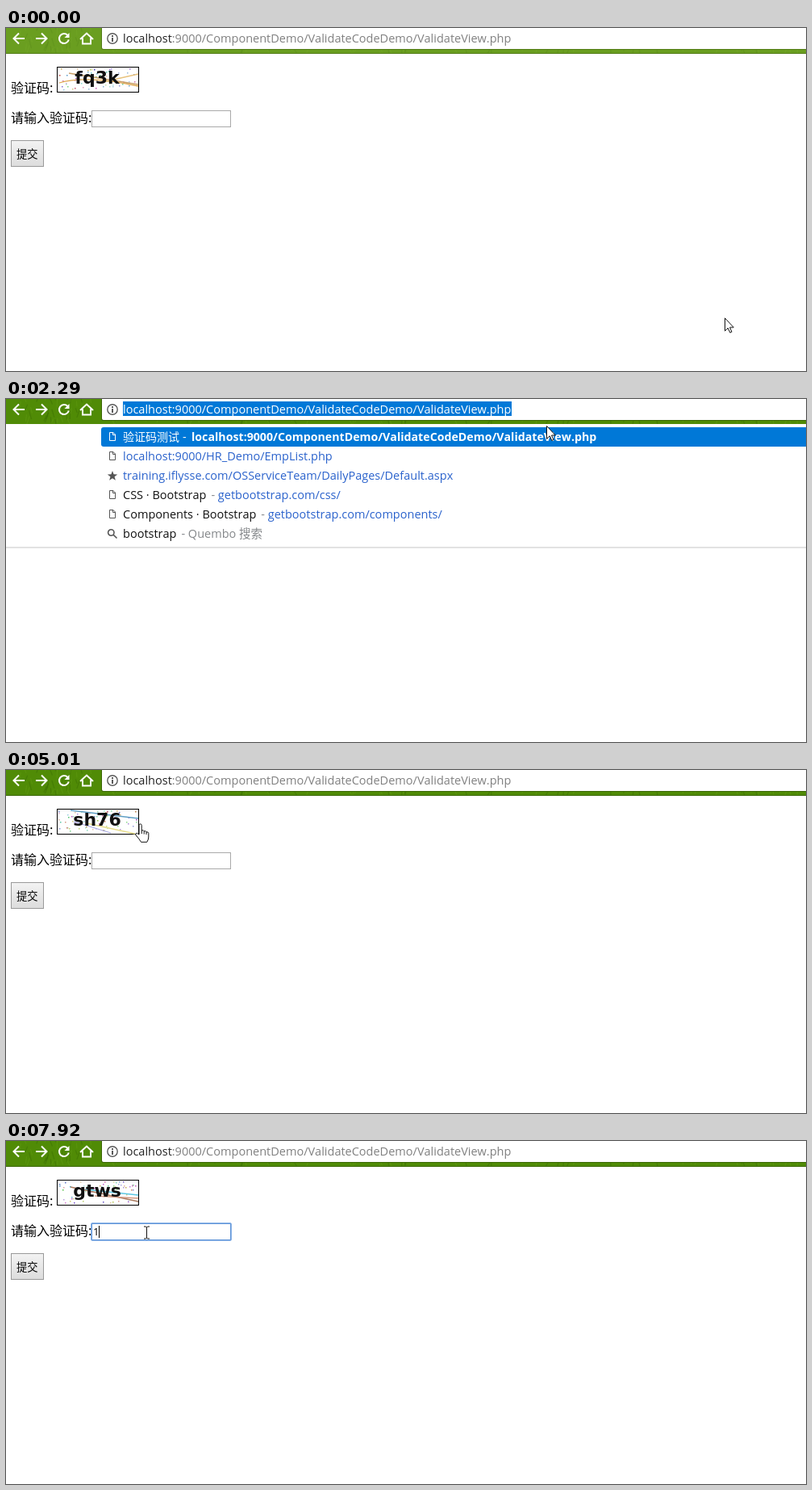
An HTML page with a canvas for the animation above (7.99 s loop, 992 by 425 pixels).

```html
<!DOCTYPE html>
<html lang="zh">
<head>
<meta charset="utf-8">
<style>
html, body { margin: 0; width: 992px; height: 425px; overflow: hidden; background: #fff; }
canvas { display: block; }
</style>
</head>
<body>
<canvas id="stage" width="992" height="425"></canvas>
<script>
const c = document.getElementById('stage').getContext('2d');
const LOOP = 7990, BLUE = '#0078d7', LINK = '#2a62cc', GREY = '#85888b';
const UI = '"Open Sans", "Noto Sans CJK SC", sans-serif';
const CJK = '"Noto Sans CJK SC", "Noto Sans CJK", sans-serif';
const HEAVY = 'bold 22px "DejaVu Sans", sans-serif';
const HOST = 'localhost', PATH = ':9000/ComponentDemo/ValidateCodeDemo/ValidateView.php';
c.fontKerning = 'none';

// Pointer moves: start, end, steps, x, y, shape on arrival
const moves = [
  [70, 360, 5, 673, 12, 'beam'],
  [1850, 1850, 1, 671, 25, 'arrow'],
  [1930, 2070, 3, 651, 45, 'arrow'],
  [2140, 2290, 3, 670, 33, 'arrow'],
  [2390, 2390, 1, 671, 32, 'arrow'],
  [2610, 2760, 3, 651, 42, 'arrow'],
  [3450, 3770, 5, 477, 135, 'arrow'],
  [3920, 3990, 2, 463, 137, 'arrow'],
  [4160, 4530, 6, 124, 61, 'hand'],
  [4860, 4860, 1, 164, 61, 'hand'],
  [5010, 5010, 1, 160, 66, 'hand'],
  [5080, 5160, 2, 142, 70, 'hand'],
  [6340, 6340, 1, 149, 69, 'arrow'],
  [6500, 6810, 5, 174, 113, 'beam']
];
const shapes = {
  arrow: new Path2D('M.5 .5V16.3L4.2 12.8L6.8 18.5L9 17.5L6.5 12H11.3Z'),
  hand: new Path2D('M5 14V2.5a1.6 1.6 0 0 1 3.2 0V9q2.5-1 3 .8q2.3-.8 2.8 1q2.5-.4 2.8 1.6V17q0 3-2 6.3H7.5Q5 19 1 14.8Q0 12.5 2.4 12.2Z'),
  beam: new Path2D('M-3.5-7.5H-1L0-6.5L1-7.5H3.5M0-6.5V6.5M-3.5 7.5H-1L0 6.5L1 7.5H3.5')
};
// Captcha codes with their scratch lines: colour, path
const captchas = [
  ['fq3k', [['#e0a850', 'M66 68Q100 58 164 72'], ['#c9a06a', 'M78 56L164 70'], ['#e8c27c', 'M120 67L164 57']]],
  ['sh76', [['#5f9fc4', 'M80 50L164 60'], ['#e6dc8a', 'M100 66L160 79'], ['#a9a9e4', 'M84 64L130 78']]],
  ['gtws', [['#5cc8e4', 'M98 60L164 67'], ['#a8785c', 'M80 57L164 75'], ['#d09880', 'M110 68L164 71']]]
];

function seeded(s) {
  return () => {
    s = s + 0x6D2B79F5 | 0;
    let z = Math.imul(s ^ s >>> 15, 1 | s);
    z = z + Math.imul(z ^ z >>> 7, 61 | z) ^ z;
    return ((z ^ z >>> 14) >>> 0) / 4294967296;
  };
}
function progress(t, t0, t1, n) {
  if (t < t0) return 0;
  return t >= t1 ? 1 : (Math.floor((t - t0) / (t1 - t0) * (n - 1)) + 1) / n;
}
function rect(x, y, w, h, fill, line) {
  c.fillStyle = fill;
  c.fillRect(x, y, w, h);
  if (line) {
    c.strokeStyle = line;
    c.lineWidth = 1;
    c.strokeRect(x + .5, y + .5, w - 1, h - 1);
  }
}
function rounded(x, y, w, h, r, fill) {
  c.fillStyle = fill;
  c.beginPath();
  c.roundRect(x, y, w, h, r);
  c.fill();
}
function text(s, x, y, color, font) {
  c.font = font || '14.5px ' + UI;
  c.fillStyle = color;
  c.fillText(s, x, y);
  return x + c.measureText(s).width;
}
function stroke(path, color, width = 1) {
  c.strokeStyle = color;
  c.lineWidth = width;
  c.stroke(typeof path === 'string' ? new Path2D(path) : path);
}

function drawBar(t) {
  const p = progress(t, 610, 760, 3), rnd = seeded(5);
  const mix = (a, b) => a + (b - a) * p;
  const edge = `rgb(${mix(82, 58)},${mix(125, 103)},${mix(22, 4)})`;
  rect(0, 0, 992, 32, `rgb(${mix(106, 80)},${mix(158, 139)},${mix(32, 6)})`);
  c.save();
  c.beginPath();
  c.rect(0, 0, 992, 31);
  c.clip();
  for (let i = 0; i < 420; i++) {
    const x = rnd() * 992, y = rnd() * 34, lean = rnd() * 8 - 4;
    c.strokeStyle = rnd() < .5 ? `rgba(30,70,0,${.08 + .12 * p})` : 'rgba(150,200,60,.13)';
    c.lineWidth = 1.2;
    c.beginPath();
    c.moveTo(x, y);
    c.lineTo(x + lean, y - 5 - rnd() * 6);
    c.stroke();
  }
  c.restore();
  rect(0, 31, 992, 1, edge);

  stroke('M23 13H10M16 6.5L9.5 13L16 19.5', '#fff', 2);
  stroke('M37 13H50M44 6.5L50.5 13L44 19.5', '#fff', 2);
  if (t >= 3080 && t < 3450) stroke('M66.5 7.5L77.5 18.5M77.5 7.5L66.5 18.5', '#fff', 1.8);
  else {
    stroke('M76.2 8.8A6 6 0 1 0 77.8 14.5', '#fff', 2);
    c.fillStyle = '#fff';
    c.fill(new Path2D('M78.5 6V12H72.5Z'));
  }
  stroke('M92 14L100 6.5L108 14M95 12.5V19.5H105V12.5', '#fff', 2);

  rounded(118, -4, 880, 31, 3, edge);
  rounded(119, -4, 880, 30, 2, '#fff');
  stroke('M138.2 13a6.2 6.2 0 1 1-12.4 0a6.2 6.2 0 1 1 12.4 0', '#5a5a5a', 1.4);
  rect(131, 9, 2, 2, '#5a5a5a');
  rect(131, 12, 2, 5, '#5a5a5a');
  const selected = t >= 910 && t < 3080;
  if (selected) rect(145, 3, 482, 18, BLUE);
  const x = text(HOST, 145, 18, selected ? '#fff' : '#222');
  text(PATH, x, 18, selected ? '#fff' : '#808080');
  if (t >= 610 && t < 910) rect(627, 4, 1, 17, '#222');
}

function drawCaptcha(t) {
  const id = t < 4780 ? 0 : t < 6500 ? 1 : 2, [code, lines] = captchas[id], rnd = seeded(id + 21);
  rect(63, 48, 102, 32, '#fff', '#000');
  for (let i = 0; i < 65; i++) {
    const x = 65 + rnd() * 97, y = 50 + rnd() * 27;
    rect(Math.floor(x), Math.floor(y), 1.5, 1.5, `hsl(${rnd() * 360},50%,${50 + rnd() * 30}%)`);
  }
  lines.forEach(([color, path]) => stroke(path, color, 1.3));
  c.textAlign = 'center';
  text(code, 113, 69, '#111', HEAVY);
  c.textAlign = 'left';
}

function drawPage(t) {
  text('验证码:', 6, 80, '#000', '16px ' + CJK);
  drawCaptcha(t);
  text('请输入验证码:', 6, 117, '#000', '16px ' + CJK);
  const focus = t >= 6890;
  rect(106, 102, 173, 21, '#fff', focus ? '#5f94d8' : '#a9a9a9');
  if (focus) {
    c.strokeStyle = '#8fb6e8';
    c.beginPath();
    c.roundRect(105.5, 101.5, 174, 22, 1.5);
    c.stroke();
  }
  if (t >= 7920) {
    text('1', 108, 117, '#000', '13.3px ' + UI);
    rect(115, 105, 1, 15, '#000');
  } else if (focus && t < 7520) rect(108, 105, 1, 15, '#000');
  if (t >= 6970 && t < 7920) rect(105, 124, 176, 145, '#fff', '#c8c8c8');

  const g = c.createLinearGradient(0, 139, 0, 172);
  g.addColorStop(0, '#f3f3f3');
  g.addColorStop(1, '#dcdcdc');
  rect(6, 139, 41, 33, g, '#9a9a9a');
  text('提交', 13, 161, '#000', '13.3px ' + CJK);

  if (t >= 5560 && t < 6420) {
    c.globalAlpha = progress(t, 5560, 5790, 4);
    rect(149, 96, 61, 22, 'rgba(0,0,0,.16)');
    rect(148, 95, 61, 22, 'rgba(0,0,0,.25)');
    rect(146, 93, 61, 22, '#fff', '#8a8a8a');
    text('点击刷新', 152, 108, '#808080', '12px ' + CJK);
    c.globalAlpha = 1;
  }
}

function docIcon(y, color) {
  stroke(`M128.5 ${y - 5.5}H133L135.5 ${y - 3}V${y + 4.5}H128.5ZM132.5 ${y - 5}V${y - 2.5}H135`, color);
}
function drawSuggestions() {
  rect(0, 31, 992, 152, '#fff');
  rect(0, 183, 992, 2, '#e2e2e2');
  rounded(118, 35, 880, 24, 3, BLUE);
  text('验证码测试', 145, 52, '#fff', '14px ' + CJK);
  text('-', 219, 52, '#fff');
  text(HOST + PATH, 230, 52, '#fff', 'bold 14.2px ' + UI);
  text('localhost:9000/HR_Demo/EmpList.php', 145, 76, LINK);
  text('training.iflysse.com/OSServiceTeam/DailyPages/Default.aspx', 145, 100, LINK);
  const rows = [
    ['CSS · Bootstrap', 'getbootstrap.com/css/', LINK],
    ['Components · Bootstrap', 'getbootstrap.com/components/', LINK],
    ['bootstrap', 'Quembo 搜索', GREY]
  ];
  rows.forEach(([title, note, color], i) => {
    const y = 124 + i * 24, x = text(title, 145, y, '#111');
    text(note, text('- ', x + 6, y, GREY), y, color);
  });
  docIcon(47, '#fff');
  [71, 119, 143].forEach(y => docIcon(y, '#555'));
  c.fillStyle = '#555';
  c.beginPath();
  for (let i = 0; i < 10; i++) {
    const a = (i / 5 - .5) * Math.PI, r = i % 2 ? 2.7 : 6.5;
    c.lineTo(132 + r * Math.cos(a), 95.5 + r * Math.sin(a));
  }
  c.fill();
  stroke('M134 165.5a3.7 3.7 0 1 1-7.4 0a3.7 3.7 0 1 1 7.4 0M133 168.2L137.5 172.5', '#555', 1.6);
}

function drawPointer(t) {
  let x = 891, y = 359, kind = 'arrow';
  for (const [t0, t1, n, tx, ty, shape] of moves) {
    const p = progress(t, t0, t1, n);
    x += (tx - x) * p;
    y += (ty - y) * p;
    if (p < 1) break;
    kind = shape;
  }
  const half = kind === 'beam' ? .5 : 0;
  c.save();
  c.translate(Math.round(x) + half, Math.round(y) + half);
  if (kind !== 'beam') {
    c.fillStyle = '#fff';
    c.fill(shapes[kind]);
  }
  stroke(shapes[kind], '#111');
  if (kind === 'hand') stroke('M8.2 9V13M11.2 10V13.5M14 11V14', '#111');
  c.restore();
}

function frame() {
  const t = performance.now() % LOOP;
  rect(0, 0, 992, 425, '#fff');
  drawPage(t);
  drawBar(t);
  if (t >= 1230 && t < 3080) drawSuggestions();
  drawPointer(t);
  requestAnimationFrame(frame);
}
frame();
</script>
</body>
</html>
```
